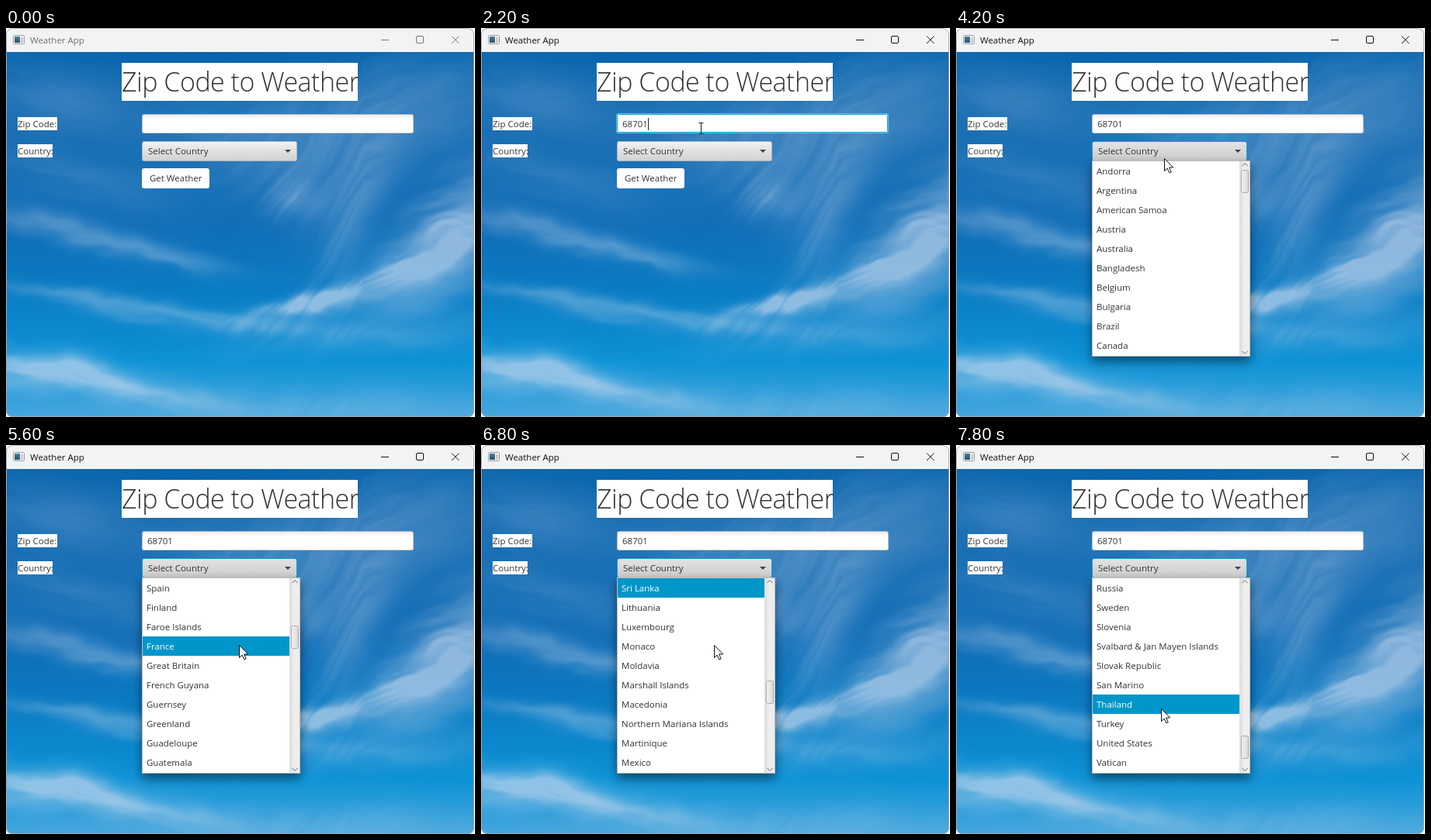
These frames come from a looping animation (604 by 502 pixels, 8 s). An HTML page with a canvas:

```html
<!DOCTYPE html>
<html lang="en">
<head>
<meta charset="utf-8">
<title>Weather App</title>
<style>
html, body { margin: 0; width: 100%; height: 100%; overflow: hidden; background: #fff; }
canvas { display: block; }
</style>
</head>
<body>
<canvas id="stage" width="604" height="502"></canvas>
<script>
const W = 604, H = 502, LOOP = 8000, STEP = 200;
const ctx = document.getElementById('stage').getContext('2d');
const FONT = '"Open Sans", "Noto Sans", sans-serif';
const INK = '#333', ACCENT = '#0096c9';
const COUNTRIES = ('Andorra,Argentina,American Samoa,Austria,Australia,Bangladesh,Belgium,Bulgaria,Brazil,Canada,' +
  'Switzerland,Czech Republic,Germany,Denmark,Dominican Republic,Spain,Finland,Faroe Islands,France,Great Britain,' +
  'French Guyana,Guernsey,Greenland,Guadeloupe,Guatemala,Guam,Guyana,Croatia,Hungary,Isle of Man,' +
  'India,Iceland,Italy,Jersey,Japan,Liechtenstein,Sri Lanka,Lithuania,Luxembourg,Monaco,' +
  'Moldavia,Marshall Islands,Macedonia,Northern Mariana Islands,Martinique,Mexico,Malaysia,Holland,Norway,New Zealand,' +
  'Philippines,Pakistan,Poland,Saint Pierre & Miquelon,Puerto Rico,Portugal,French Reunion,Russia,Sweden,Slovenia,' +
  'Svalbard & Jan Mayen Islands,Slovak Republic,San Marino,Thailand,Turkey,United States,Vatican,Virgin Islands,' +
  'Mayotte,South Africa').split(',');

// ---- sky ----

const lerp = (a, b, t) => a + (b - a) * t;
const smooth = t => t * t * (3 - 2 * t);

function hash(x, y) {
  const s = Math.sin(x * 127.1 + y * 311.7) * 43758.5453;
  return s - Math.floor(s);
}

function noise(x, y) {
  const i = Math.floor(x), j = Math.floor(y), u = smooth(x - i), v = smooth(y - j);
  return lerp(lerp(hash(i, j), hash(i + 1, j), u), lerp(hash(i, j + 1), hash(i + 1, j + 1), u), v);
}

function fbm(x, y) {
  return noise(x, y) * 0.53 + noise(x * 2.1, y * 2.1) * 0.29 + noise(x * 4.3, y * 4.3) * 0.18;
}

// y, then colour
const SKY = [
  [30, [6, 99, 172]], [130, [22, 108, 178]], [250, [14, 108, 182]],
  [340, [10, 124, 196]], [430, [12, 146, 214]], [502, [70, 166, 220]]
];

// centre x, y, radius along, radius across, tilt in degrees, strength
const CLOUDS = [
  [585, 250, 115, 36, -38, 0.72], [500, 318, 120, 22, -24, 0.48], [385, 356, 62, 13, -8, 0.72],
  [560, 330, 90, 30, -25, 0.3], [50, 442, 125, 21, 9, 0.72], [170, 466, 120, 13, 12, 0.36],
  [80, 255, 120, 18, 14, 0.32], [190, 292, 90, 12, 10, 0.38], [110, 350, 150, 11, 8, 0.26],
  [270, 378, 140, 13, 6, 0.36], [376, 218, 40, 30, 0, 0.26], [445, 235, 90, 32, -65, 0.3],
  [70, 85, 110, 45, 12, 0.17], [100, 195, 120, 30, 15, 0.15], [500, 110, 170, 70, -15, 0.22],
  [330, 150, 120, 60, 10, 0.17], [480, 400, 150, 24, -6, 0.2], [400, 495, 230, 26, 0, 0.18]
].map(([x, y, rx, ry, deg, k]) => {
  const a = deg * Math.PI / 180;
  return { x, y, rx, ry, k, c: Math.cos(a), s: Math.sin(a) };
});

function skyColor(y) {
  let i = 0;
  while (i < SKY.length - 2 && y > SKY[i + 1][0]) i++;
  const [y0, a] = SKY[i], [y1, b] = SKY[i + 1];
  const t = Math.max(0, (y - y0) / (y1 - y0));
  return a.map((v, n) => lerp(v, b[n], t));
}

function makeSky() {
  const layer = document.createElement('canvas');
  layer.width = W;
  layer.height = H;
  const g = layer.getContext('2d'), img = g.createImageData(W, H), d = img.data;
  for (let y = 30; y < H; y++) {
    const base = skyColor(y);
    for (let x = 0; x < W; x++) {
      const tilt = x < 280 ? -0.16 : lerp(-0.16, 0.4, Math.min(1, (x - 280) / 180));
      const bend = fbm(x / 90, y / 60) * 34;
      const wisp = fbm(x / 95 + 7, (y + x * tilt + bend) / 17);
      const wx = x + (wisp - 0.5) * 26, wy = y + bend - 17;
      let cover = 0;
      for (const b of CLOUDS) {
        const dx = wx - b.x, dy = wy - b.y;
        const u = (dx * b.c + dy * b.s) / b.rx, v = (dy * b.c - dx * b.s) / b.ry;
        const q = u * u + v * v;
        if (q < 5) cover += b.k * Math.exp(-q * 1.1);
      }
      cover = Math.min(0.72, cover * (0.55 + wisp * 0.9));
      const p = (y * W + x) * 4;
      d[p] = lerp(base[0], 192, cover);
      d[p + 1] = lerp(base[1], 212, cover);
      d[p + 2] = lerp(base[2], 236, cover);
      d[p + 3] = 255;
    }
  }
  g.putImageData(img, 0, 0);
  return layer;
}

const sky = makeSky();

// ---- helpers ----

function box(x, y, w, h, r, fill, stroke) {
  ctx.beginPath();
  ctx.roundRect(x, y, w, h, r);
  if (fill) { ctx.fillStyle = fill; ctx.fill(); }
  if (stroke) { ctx.strokeStyle = stroke; ctx.lineWidth = 1; ctx.stroke(); }
}

function text(str, x, y, color = INK, font = '11.5px ' + FONT, spacing = 0) {
  ctx.font = font;
  ctx.letterSpacing = spacing + 'px';
  ctx.fillStyle = color;
  ctx.fillText(str, x, y);
}

function path(points, fill, stroke, close = true) {
  ctx.beginPath();
  points.forEach(([x, y]) => ctx.lineTo(x, y));
  if (close) ctx.closePath();
  if (fill) { ctx.fillStyle = fill; ctx.fill(); }
  if (stroke) { ctx.strokeStyle = stroke; ctx.lineWidth = 1; ctx.stroke(); }
}

function shade(x0, y0, x1, y1, ...colors) {
  const g = ctx.createLinearGradient(x0, y0, x1, y1);
  colors.forEach((c, i) => g.addColorStop(i / (colors.length - 1), c));
  return g;
}

// ---- state at a given time ----

// time, first visible row, pointer x, pointer y, highlighted row (-1 for none)
const LIST = [
  [3000, 0, 268, 168, -1], [5200, 0, 300, 258, 3], [5400, 6, 300, 258, 3], [5600, 15, 300, 258, 3],
  [5800, 18, 300, 258, 3], [6000, 21, 300, 258, 3], [6200, 24, 300, 258, 3], [6400, 27, 300, 258, 3],
  [6600, 33, 300, 258, 3], [6800, 36, 300, 258, 0], [7000, 42, 300, 258, 3], [7200, 48, 300, 258, 3],
  [7400, 57, 300, 258, 3], [7600, 57, 283, 298, 5], [7800, 57, 264, 340, 6]
];

function stateAt(t) {
  const row = LIST.filter(r => r[0] <= t).pop();
  const moved = Math.min(1, (t - 2200) / 600);
  return {
    active: t >= 200,
    zip: '68701'.slice(0, Math.max(0, Math.floor((t - 800) / STEP))),
    focus: t >= 200 && t < 2800,
    caret: t >= 200 && t < 2800 && !(t >= 600 && t < 1000),
    comboFocus: t >= 2800,
    popup: row && { first: row[1], hot: row[4] },
    beam: t < 2400,
    pointer: row ? [row[2], row[3]] : [lerp(283, 268, moved), lerp(129, 168, moved)]
  };
}

// ---- parts ----

function titleBar(active) {
  ctx.fillStyle = '#f3f3f3';
  ctx.fillRect(0, 0, W, 31);
  const ink = active ? '#111' : '#777';
  box(9.5, 9.5, 14, 11, 1, '#f4f6f8', '#929ba4');
  ctx.fillStyle = shade(11, 11, 11, 19, '#4b8590', '#294f70');
  ctx.fillRect(11, 11, 7, 8);
  ctx.fillStyle = '#c4ccd4';
  ctx.fillRect(19, 12, 3, 7);
  text('Weather App', 31, 20, active ? '#111' : '#707070');
  path([[483, 15.5], [493, 15.5]], null, ink, false);
  box(528.5, 10.5, 9, 9, 1.5, null, ink);
  path([[574, 10.5], [583.5, 20]], null, ink, false);
  path([[583.5, 10.5], [574, 20]], null, ink, false);
}

function label(str, y, w) {
  ctx.fillStyle = '#fff';
  ctx.fillRect(15, y, w, 17);
  text(str, 15, y + 13);
}

function zipField(s) {
  if (s.focus) {
    box(174.5, 110.5, 350, 25, 3, '#fff', '#5bc5e6');
    box(175.5, 111.5, 348, 23, 2, null, '#139fcf');
  } else {
    box(175, 111, 350, 25, 3, shade(0, 111, 0, 136, '#a9b4be', '#c5cdd4'));
    box(176, 112, 348, 23, 2, shade(0, 112, 0, 135, '#ececec', '#fff', '#fff', '#fff', '#fff'));
  }
  text(s.zip, 182, 128);
  if (s.caret) {
    ctx.fillStyle = '#222';
    ctx.fillRect(s.zip ? 182 + Math.round(ctx.measureText(s.zip).width) : 182, 116, 1, 16);
  }
}

function combo(focus) {
  box(175, 146, 200, 26, 3, focus ? '#139fcf' : '#b0b5ba');
  box(176, 147, 198, 24, 2, focus
    ? shade(0, 147, 0, 171, '#e2e2e2', '#cecece')
    : shade(0, 147, 0, 171, '#f2f2f2', '#e0e0e0', '#d2d2d2'));
  text('Select Country', 183, 163);
  path([[359, 157], [367, 157], [363, 161]], '#444');
}

function scrollBar(first) {
  ctx.fillStyle = shade(365, 0, 378, 0, '#dcdcdc', '#efefef', '#ececec');
  ctx.fillRect(365, 172, 13, 251);
  const arrow = (y, dir) => path([[368.5, y + 2 * dir], [372, y - 1.5 * dir], [375.5, y + 2 * dir]], null, '#666', false);
  arrow(176, 1);
  arrow(419, -1);
  const y = Math.round(183 + first * 3.36);
  box(367.5, y + 0.5, 9, 29, 2, shade(367, 0, 377, 0, '#f4f4f4', '#d8d8d8'), '#adadad');
}

function popup({ first, hot }) {
  ctx.save();
  ctx.shadowColor = 'rgba(0,0,0,.5)';
  ctx.shadowBlur = 13;
  ctx.shadowOffsetY = 6;
  ctx.fillStyle = '#b9bfc4';
  ctx.fillRect(175, 171, 204, 253);
  ctx.restore();
  ctx.fillStyle = '#fff';
  ctx.fillRect(176, 172, 202, 251);
  for (let i = 0; i < 10; i++) {
    const y = 172 + i * 25;
    if (i === hot) {
      ctx.fillStyle = ACCENT;
      ctx.fillRect(176, y, 189, 25);
    }
    text(COUNTRIES[first + i], 181, y + 17, i === hot ? '#fff' : INK);
  }
  scrollBar(first);
}

function pointer(x, y, beam) {
  ctx.save();
  ctx.translate(Math.round(x) + 0.5, Math.round(y) + 0.5);
  if (beam) {
    path([[-3, -7], [3, -7]], null, '#222', false);
    path([[-3, 7], [3, 7]], null, '#222', false);
    path([[0, -7], [0, 7]], null, '#222', false);
  } else {
    path([[0, 0], [0, 16], [3.6, 12.6], [6.3, 18.4], [8.7, 17.3], [6.1, 11.6], [11.2, 11.4]], '#fff', '#111');
  }
  ctx.restore();
}

function draw(t) {
  const s = stateAt(t);
  ctx.fillStyle = '#fff';
  ctx.fillRect(0, 0, W, H);
  ctx.save();
  ctx.beginPath();
  ctx.roundRect(0, 0, 603, 502, 8);
  ctx.clip();
  ctx.drawImage(sky, 0, 0);
  titleBar(s.active);
  ctx.fillStyle = '#fff';
  ctx.fillRect(149, 45, 304, 49);
  text('Zip Code to Weather', 149, 82, INK, '300 34px ' + FONT, -0.5);
  label('Zip Code:', 115, 51);
  label('Country:', 150, 45);
  zipField(s);
  combo(s.comboFocus);
  box(175, 181, 87, 26, 3, '#fff');
  text('Get Weather', 185, 198);
  if (s.popup) popup(s.popup);
  ctx.restore();
  box(0.5, 0.5, 602, 501, 8, null, '#a3a8ad');
  pointer(...s.pointer, s.beam);
}

function tick() {
  const t = performance.now() % LOOP;
  draw(Math.floor(t / STEP) * STEP);
  requestAnimationFrame(tick);
}
tick();
</script>
</body>
</html>
```
